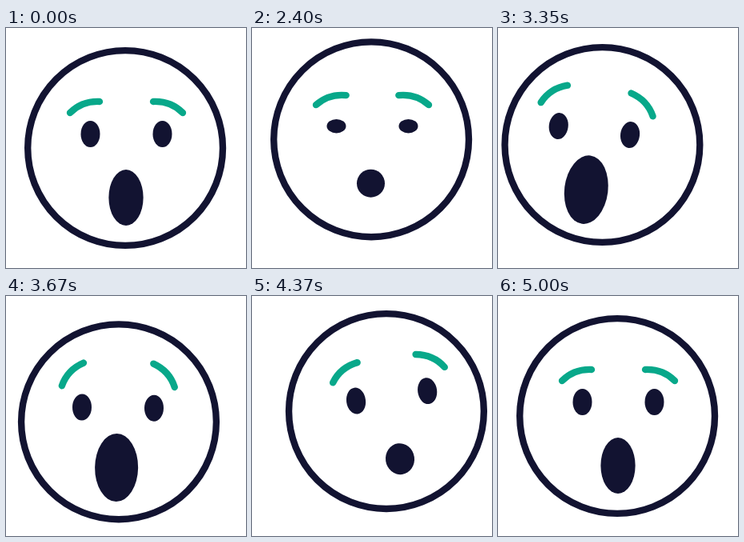
Recreate the animation shown at these times as an HTML page. Size 300 by 300 pixels, loop 5020 ms.

```html
<!DOCTYPE html>
<html lang="en">
<head>
<meta charset="utf-8">
<title>Surprised face</title>
<style>
  html, body { margin: 0; width: 100%; height: 100%; overflow: hidden; background: #fff; }
  svg { display: block; width: 100vw; height: 100vh; }
  .line { fill: none; stroke-width: 8.37; stroke-linecap: round; }
  .navy { fill: #121331; }
  .head { stroke: #121331; }
  .brow { stroke: #08a88a; }
</style>
</head>
<body>
<svg viewBox="0 0 300 300">
  <circle id="head" class="line head" cx="149.1" cy="150" r="121.9"/>
  <!-- Features are placed relative to the point between the eyes. -->
  <g id="features">
    <path id="browL" class="line brow" d="M-70.5-26.5Q-55.5-41.5-33.5-40.5"/>
    <path id="browR" class="line brow" d="M70.5-26.5Q55.5-41.5 33.5-40.5"/>
    <ellipse id="eyeL" class="navy" cx="-45" rx="12"/>
    <ellipse id="eyeR" class="navy" cx="45" rx="12"/>
    <ellipse id="mouth" class="navy"/>
  </g>
</svg>
<script>
const LOOP = 5020, BEGIN = 1990, LAND = 2600, LEFT = 3290, RIGHT = 4350, END = 4720;

const ease = u => (1 - Math.cos(Math.PI * u)) / 2;

// Eases from one [time, value] turning point to the next.
function ramp(t, ...keys) {
  const i = keys.findIndex(k => k[0] > t);
  if (i === 0) return keys[0][1];
  if (i < 0) return keys[keys.length - 1][1];
  const [t0, a] = keys[i - 1], [t1, b] = keys[i];
  return a + (b - a) * ease((t - t0) / (t1 - t0));
}

// Looking direction: -1 left, 1 right; lead is how early the turn to the right ends.
const side = (t, lead) =>
  ramp(t, [LAND, 0], [LEFT, -1], [RIGHT - lead, 1], [RIGHT, 1], [END, 0]);
const lean = (s, left, right) => s < 0 ? -s * left : s * right;

// Dip, hop, then a swing that sinks between the two sides.
const height = t => ramp(t, [BEGIN, 0], [2190, 18], [2410, -10.8], [2660, 0],
  [3340, -4], [3800, 9.8], [RIGHT, -6], [END, 0]);

// The mouth purses on the hop, gapes, purses again and relaxes.
const mouthPart = (t, rest, pursed, wide, last) =>
  ramp(t, [BEGIN, rest], [2400, pursed], [2900, wide], [3600, wide], [4380, last], [END, rest]);

function set(id, attrs) {
  const node = document.getElementById(id);
  for (const name in attrs) node.setAttribute(name, attrs[name]);
}

function draw(t) {
  const y = height(t), look = side(t, 80);
  const blink = ramp(t, [2080, 0], [2350, 1], [2560, 0]);
  const raise = ramp(t, [BEGIN, 0], [2400, -3], [3900, 28.3], [END, 0]);
  const faceX = 150.5 + lean(look, -30.7, 24.3);
  const faceY = 132.5 + y + blink + lean(look, -0.5, -1.7);
  const tilt = lean(side(t, 250), 7.2, -7.95);

  set("head", { transform: `translate(${19 * side(t, 0)} ${y})` });
  set("features", { transform: `translate(${faceX} ${faceY}) rotate(${tilt})` });
  set("browL", { transform: `rotate(${-raise} -70.5 -26.5)` });
  set("browR", { transform: `rotate(${raise} 70.5 -26.5)` });
  for (const id of ["eyeL", "eyeR"]) set(id, { ry: 16.5 - 9 * blink });
  set("mouth", {
    cx: mouthPart(t, -0.5, -2, -1, -0.5),
    cy: mouthPart(t, 79.5, 71.5, 74.8, 79.5),
    rx: mouthPart(t, 21.6, 17.5, 27.2, 18),
    ry: mouthPart(t, 35, 17.5, 43, 19.5)
  });
}

const start = performance.now();
function tick() {
  draw((performance.now() - start) % LOOP);
  requestAnimationFrame(tick);
}
draw(0);
requestAnimationFrame(tick);
</script>
</body>
</html>
```
